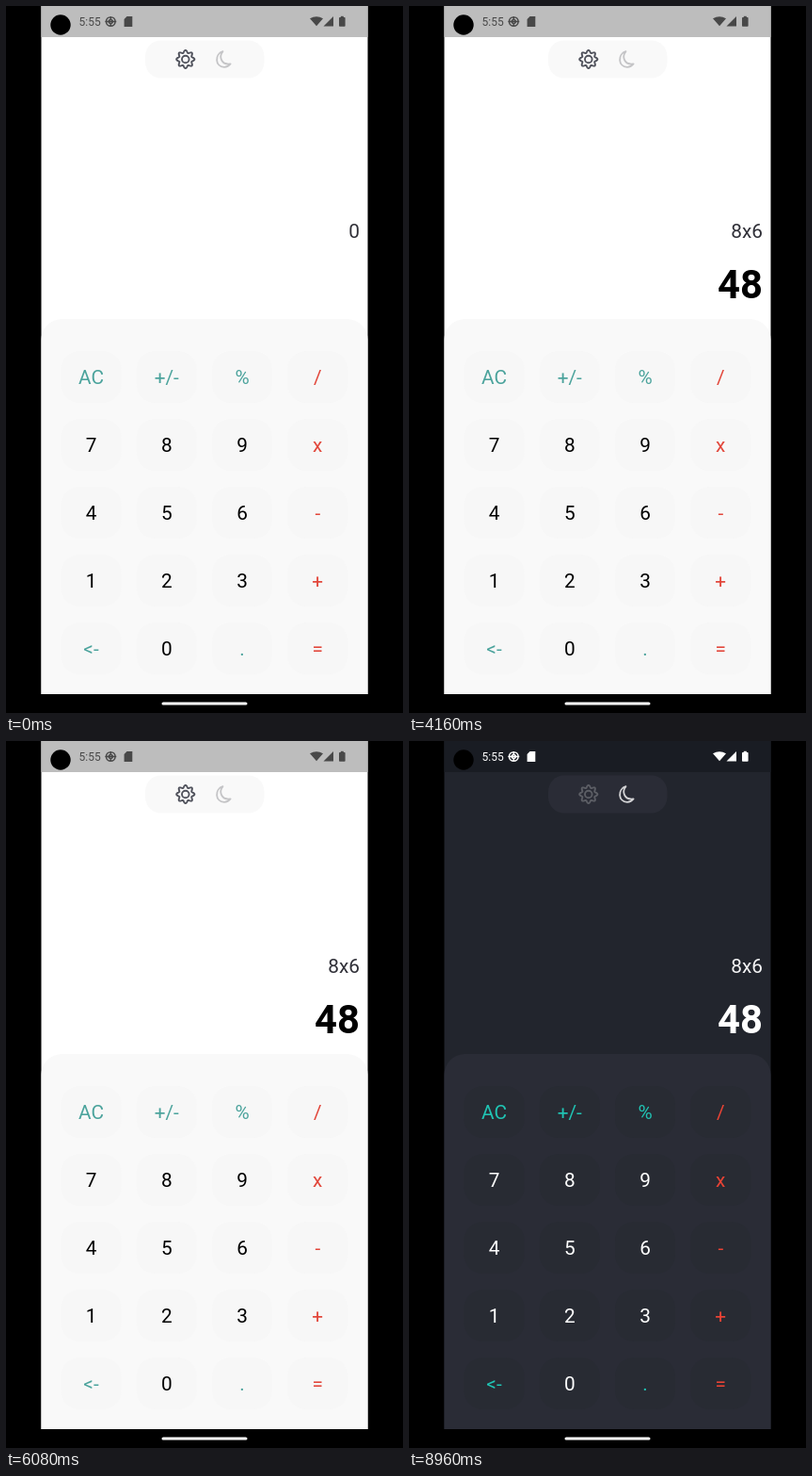
Animation, 422 px wide and 750 px high, one loop 9040 ms. Source, as an HTML page with a canvas:

```html
<!DOCTYPE html>
<html lang="en">
<head>
<meta charset="utf-8">
<title>Calculator</title>
<style>
html, body { margin: 0; width: 100%; height: 100%; overflow: hidden; background: #000; }
canvas { display: block; width: 422px; height: 750px; }
</style>
</head>
<body>
<canvas id="stage"></canvas>
<script>
const W = 422, H = 750, LOOP = 9040, STEP = 80;
const FONT = 'Roboto, "Liberation Sans", sans-serif';
const canvas = document.getElementById('stage');
const ctx = canvas.getContext('2d');
const dpr = window.devicePixelRatio || 1;
canvas.width = W * dpr;
canvas.height = H * dpr;

const LIGHT = {
  bar: '#bdbdbd', bg: '#ffffff', panel: '#f9f9f9', key: '#f7f7f7', press: '#f2f3f5',
  digit: '#000000', teal: '#4ba39c', red: '#e2463a', small: '#303038', big: '#000000',
  sun: '#50525c', moon: '#c4c4c6'
};
const DARK = {
  bar: '#191c23', bg: '#22252d', panel: '#2a2c36', key: '#282b33', press: '#30333c',
  digit: '#ffffff', teal: '#20c4b4', red: '#ea4335', small: '#f4f4f5', big: '#ffffff',
  sun: '#5c5e65', moon: '#d4d4d6'
};

const ROWS = [
  ['AC', '+/-', '%', '/'],
  ['7', '8', '9', 'x'],
  ['4', '5', '6', '-'],
  ['1', '2', '3', '+'],
  ['<-', '0', '.', '=']
];
const PRESSES = { '8': 160, 'x': 800, '6': 1440, '=': 2640 };
const KEY_DELAY = 160;
const TOGGLES = [4240, 5600, 6240];

const clamp = v => Math.max(0, Math.min(1, v));

function box(x, y, w, h, r, color) {
  ctx.beginPath();
  ctx.roundRect(x, y, w, h, r);
  ctx.fillStyle = color;
  ctx.fill();
}

function disc(x, y, r, color) {
  ctx.beginPath();
  ctx.arc(x, y, r, 0, Math.PI * 2);
  ctx.fillStyle = color;
  ctx.fill();
}

function poly(points, color) {
  ctx.beginPath();
  points.forEach(([x, y]) => ctx.lineTo(x, y));
  ctx.closePath();
  ctx.fillStyle = color;
  ctx.fill();
}

function label(text, x, y, size, color, align = 'center', weight = 400) {
  ctx.font = `${weight} ${size}px ${FONT}`;
  ctx.textAlign = align;
  ctx.fillStyle = color;
  ctx.fillText(text, x, y);
}

function drawStatus(theme, ink) {
  box(37.5, 0, 347, 33, 0, theme.bar);
  disc(58, 20, 10.7, '#000');
  label('5:55', 77.5, 21, 12, ink, 'left');

  ctx.strokeStyle = ink;
  ctx.lineWidth = 1.5;
  ctx.beginPath();
  ctx.arc(111.3, 16.5, 4.8, 0, Math.PI * 2);
  ctx.moveTo(105.3, 16.5);
  ctx.lineTo(117.3, 16.5);
  ctx.moveTo(113.3, 16.5);
  ctx.arc(111.3, 16.5, 2, 0, Math.PI * 2);
  ctx.moveTo(111.3, 11);
  ctx.lineTo(111.3, 14);
  ctx.moveTo(111.3, 19);
  ctx.lineTo(111.3, 22);
  ctx.stroke();

  poly([[128.5, 11], [134.3, 11], [134.3, 22], [125.6, 22], [125.6, 14]], ink);

  ctx.beginPath();
  ctx.moveTo(330, 21.3);
  ctx.lineTo(323, 13.2);
  ctx.quadraticCurveTo(330, 9.2, 337, 13.2);
  ctx.closePath();
  ctx.fillStyle = ink;
  ctx.fill();
  poly([[348, 11], [348, 21.5], [337.5, 21.5]], ink);
  box(354, 12, 6.6, 9.8, 0.8, ink);
  box(355.8, 10.8, 3, 1.2, 0, ink);
}

function drawSwitch(theme) {
  box(148, 36.5, 126.5, 40, 17, theme.panel);

  ctx.strokeStyle = theme.sun;
  ctx.lineWidth = 1.9;
  ctx.lineJoin = 'round';
  ctx.beginPath();
  for (let i = 0; i < 96; i++) {
    const a = i / 96 * Math.PI * 2;
    const r = 8.3 + 1.3 * Math.cos(8 * a);
    ctx.lineTo(190.8 + r * Math.sin(a), 56.5 - r * Math.cos(a));
  }
  ctx.closePath();
  ctx.stroke();
  ctx.beginPath();
  ctx.arc(190.8, 56.5, 3.8, 0, Math.PI * 2);
  ctx.stroke();

  ctx.strokeStyle = theme.moon;
  ctx.lineWidth = 1.8;
  ctx.beginPath();
  ctx.moveTo(230.5, 48.2);
  ctx.bezierCurveTo(221.5, 51, 222, 64.5, 232, 64.8);
  ctx.quadraticCurveTo(236, 64.7, 238.6, 61.4);
  ctx.bezierCurveTo(229, 62.8, 225.8, 54, 230.5, 48.2);
  ctx.closePath();
  ctx.stroke();
}

function drawRipple(x, y, age, color) {
  if (age < 0 || age > 800) return;
  const grow = clamp((age + STEP) / 240);
  ctx.save();
  ctx.beginPath();
  ctx.roundRect(x - 32, y - 27.5, 64, 55, 20);
  ctx.clip();
  ctx.globalAlpha = clamp((800 - age) / 320);
  disc(x, y, 10 + 34 * grow, color);
  ctx.restore();
}

function drawKeys(theme, t) {
  box(37.5, 332, 347, 398, [22, 22, 0, 0], theme.panel);
  ROWS.forEach((row, r) => row.forEach((key, c) => {
    const x = 90.5 + 80.25 * c, y = 393.5 + 72 * r;
    const color = c === 3 ? theme.red
      : r === 0 || key === '<-' || key === '.' ? theme.teal : theme.digit;
    box(x - 32, y - 27.5, 64, 55, 20, theme.key);
    if (key in PRESSES) drawRipple(x, y, t - PRESSES[key], theme.press);
    label(key, x, y + 7.4, 20.8, color);
  }));
}

function drawDisplay(theme, t) {
  const done = key => t >= PRESSES[key] + KEY_DELAY;
  const typed = ['8', 'x', '6'].filter(done).join('');
  label(done('=') ? '8x6' : '0', 376, 246.3, 20.8, theme.small, 'right');
  label(done('=') ? '48' : typed, 376, 310, 41.8, theme.big, 'right', 700);
}

function draw(now) {
  const t = Math.floor(now % LOOP / STEP) * STEP;
  const passed = TOGGLES.filter(at => t >= at);
  const dark = passed.length % 2 === 1;
  const theme = dark ? DARK : LIGHT;

  // The status icons change tone a little later than the rest.
  const fade = passed.length ? clamp((t - passed[passed.length - 1]) / 160) : 1;
  const white = dark ? fade : 1 - fade;
  const tone = Math.round(255 * white);
  const ink = `rgba(${tone},${tone},${tone},${0.62 + 0.38 * white})`;

  ctx.setTransform(dpr, 0, 0, dpr, 0, 0);
  box(0, 0, W, H, 0, '#000');
  box(37.5, 0, 347, 730, 0, theme.bg);
  drawStatus(theme, ink);
  drawSwitch(theme);
  drawDisplay(theme, t);
  drawKeys(theme, t);
  box(165.5, 738.4, 91, 3.2, 1.6, '#fff');
}

const start = performance.now();
function tick() {
  draw(performance.now() - start);
  requestAnimationFrame(tick);
}
tick();
</script>
</body>
</html>
```
